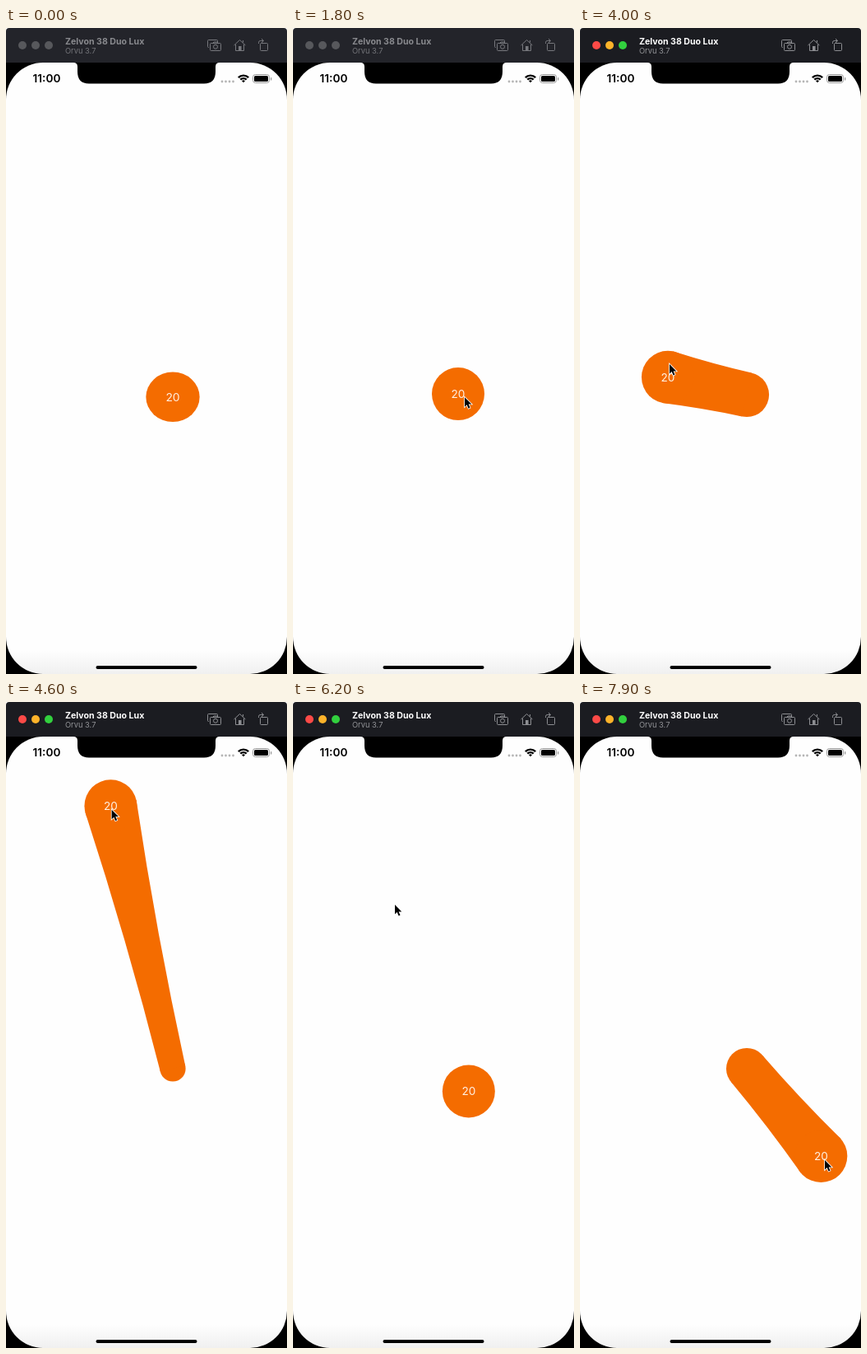
Recreate the animation shown at these times as an HTML page with a canvas. Size 342 by 784 pixels, loop 8000 ms.

```html
<!DOCTYPE html>
<html lang="en">
<head>
<meta charset="utf-8">
<title>Elastic badge</title>
<style>
html, body { margin: 0; width: 100%; height: 100%; overflow: hidden; background: #000; }
canvas { display: block; width: 342px; height: 784px; }
</style>
</head>
<body>
<canvas id="stage" width="342" height="784"></canvas>
<script>
const ctx = document.getElementById('stage').getContext('2d');
const LOOP = 8000, STEP = 100, TAU = Math.PI * 2;
const ORANGE = '#f46c00', HOME = [203, 445], RADIUS = 32;
const ACTIVE_FROM = 2500, CURSOR_FROM = 600, LAG = 40;
const drags = [{ from: 700, to: 1900 }, { from: 3100, to: 6000 }, { from: 7400, to: LOOP }];
const taps = [{ at: 0, depth: .055, shift: 2.8 }, { at: 2700, depth: .345, shift: -2 }];

// Turning points of the cursor: time, x, y
const cursorPath = [
  [700, 211, 449], [1200, 205, 728], [1700, 209, 448], [2700, 208, 454], [3100, 204, 449],
  [3400, 150, 568], [3750, 104, 515], [4000, 109, 408], [4500, 128, 130], [4900, 130, 140],
  [5200, 183, 402], [5400, 208, 452], [5800, 124, 246], [6200, 124, 246], [6600, 206, 448],
  [7400, 206, 448], [7900, 298, 556]
];

// Monotone cubic interpolation: smooth, without overshoot
function cursorAt(t) {
  const path = cursorPath, last = path.length - 1;
  if (t <= path[0][0]) return path[0].slice(1);
  if (t >= path[last][0]) return path[last].slice(1);
  const i = path.findIndex(key => key[0] > t) - 1;
  const a = path[i], b = path[i + 1], span = b[0] - a[0], u = (t - a[0]) / span;
  return [1, 2].map(axis => {
    const slope = n => n < 0 || n >= last ? 0
      : (path[n + 1][axis] - path[n][axis]) / (path[n + 1][0] - path[n][0]);
    const tangent = n => {
      const p = slope(n - 1), q = slope(n);
      return p * q > 0 ? 2 * p * q / (p + q) : 0;
    };
    return a[axis] * (1 + 2 * u) * (1 - u) ** 2 + b[axis] * u * u * (3 - 2 * u)
      + span * (tangent(i) * u * (1 - u) ** 2 + tangent(i + 1) * u * u * (u - 1));
  });
}

// The badge trails the cursor while dragged, then springs back home
function badgeAt(t) {
  const drag = drags.findLast(d => t >= d.from);
  if (!drag) return { pos: HOME, held: false };
  const grip = cursorAt(drag.from), pulled = cursorAt(Math.min(t, drag.to) - LAG);
  const s = Math.max(0, t - drag.to) / 1000;
  const spring = Math.exp(-10 * s) * Math.cos(TAU * s / .4);
  return {
    pos: HOME.map((h, i) => h + (pulled[i] - grip[i]) * spring),
    held: t < drag.to
  };
}

function disc(x, y, r, color) {
  ctx.fillStyle = color;
  ctx.beginPath();
  ctx.arc(x, y, r, 0, TAU);
  ctx.fill();
}

function box(x, y, w, h, r, color) {
  ctx.fillStyle = color;
  ctx.beginPath();
  ctx.roundRect(x, y, w, h, r);
  ctx.fill();
}

function outline(x, y, w, h, r, color) {
  ctx.strokeStyle = color;
  ctx.lineWidth = 1;
  ctx.beginPath();
  ctx.roundRect(x, y, w, h, r);
  ctx.stroke();
}

function line(path, color) {
  ctx.strokeStyle = color;
  ctx.lineWidth = 1;
  ctx.stroke(new Path2D(path));
}

function label(text, x, y, font, color, align = 'left') {
  ctx.font = font + ' Inter, sans-serif';
  ctx.fillStyle = color;
  ctx.textAlign = align;
  ctx.fillText(text, x, y);
}

function drawTitleBar(active) {
  const back = active ? '#1b1c21' : '#23242a', gray = active ? '#8d8e92' : '#77787d';
  ctx.fillStyle = '#fff';
  ctx.fillRect(0, 0, 342, 8);
  box(0, 0, 342, 42, [4, 4, 0, 0], back);
  const lights = active ? ['#fc4a47', '#fdb32a', '#32d03e'] : Array(3).fill('#57585c');
  lights.forEach((color, i) => disc(20 + 16 * i, 21, 5, color));
  label('Zelvon 38 Duo Lux', 72, 20, '700 10.6px', active ? '#fff' : '#898a8e');
  label('Orvu 3.7', 72, 31, '400 9.3px', active ? '#929397' : '#737479');

  outline(245.5, 14.5, 12, 9, 1, gray);
  box(247, 17, 15, 11, 1, back);
  outline(248.5, 18.5, 13, 9, 1, gray);
  line('M252 18L253 17H257L258 18M257.5 22.8A2.5 2.5 0 1 1 252.5 22.8A2.5 2.5 0 1 1 257.5 22.8', gray);
  line('M277.5 21L284.5 14.5L291.5 21M279.5 20V27.5H289.5V20M288.5 17.5V15', gray);
  box(283, 22, 3.5, 5.5, 0, gray);
  outline(309.5, 18.5, 9, 9, 1, gray);
  line('M307.5 19V17.5Q307.5 15.5 309.5 15.5H313M311 13L313.5 15.5L311 18', gray);
}

function drawScreen() {
  ctx.fillStyle = '#000';
  ctx.fillRect(0, 42, 342, 742);
  const shade = ctx.createLinearGradient(0, 755, 0, 784);
  shade.addColorStop(0, '#fefefe');
  shade.addColorStop(1, '#f0f0f0');
  box(0, 42, 342, 742, 45, shade);
  ctx.fillStyle = '#000';
  ctx.fill(new Path2D('M82 42Q87 42 87 47V53Q87 67.5 101 67.5H241Q255 67.5 255 53V47Q255 42 260 42Z'));
  box(109.5, 774, 123, 4, 2, '#000');
}

function drawStatus() {
  label('11:00', 49.5, 66.3, '600 13.6px', '#000', 'center');
  for (let i = 0; i < 4; i++) disc(263 + 4.5 * i, 65, 1.4, '#b5b5b5');
  ctx.strokeStyle = '#000';
  ctx.lineWidth = 2.4;
  for (const r of [1.6, 5.2, 8.7]) {
    ctx.beginPath();
    ctx.arc(289, 66.3, r, -Math.PI * .75, -Math.PI * .25);
    ctx.stroke();
  }
  outline(300.5, 56.5, 20, 10, 3, '#999');
  box(302, 58, 17, 7, 1.6, '#000');
  box(322, 60, 1.3, 3.5, .6, '#999');
}

// Slightly pinched band from the shrinking anchor to the badge
function drawTail(x, y) {
  const dx = x - HOME[0], dy = y - HOME[1], d = Math.hypot(dx, dy);
  if (d < 3) return;
  const r = RADIUS - .05 * d, neck = (r + RADIUS) / 2 * (1 - .0007 * d);
  const edge = (cx, cy, w) => [cx - dy / d * w, cy + dx / d * w];
  const mid = [HOME[0] + dx / 2, HOME[1] + dy / 2];
  disc(...HOME, r, ORANGE);
  ctx.beginPath();
  ctx.moveTo(...edge(...HOME, r));
  ctx.quadraticCurveTo(...edge(...mid, neck), ...edge(x, y, RADIUS));
  ctx.lineTo(...edge(x, y, -RADIUS));
  ctx.quadraticCurveTo(...edge(...mid, -neck), ...edge(...HOME, -r));
  ctx.fill();
}

function drawBadge(t) {
  const { pos: [x, y], held } = badgeAt(t);
  if (held) drawTail(x, y);
  ctx.save();
  ctx.translate(x, y);
  for (const { at, depth, shift } of taps) {
    const pulse = Math.exp(-(((t - at) / 90) ** 2));
    ctx.translate(0, shift * pulse);
    ctx.scale(1 + .02 * pulse, 1 - depth * pulse);
  }
  disc(0, 0, RADIUS, ORANGE);
  label('20', 0, 5, '400 13.6px', '#fff0e2', 'center');
  ctx.restore();
}

function drawCursor(t) {
  if (t < CURSOR_FROM) return;
  ctx.save();
  ctx.translate(...cursorAt(t));
  const arrow = new Path2D('M0 0V11.6L2.7 9.1L4.6 13.5L6.5 12.7L4.6 8.4H8.3Z');
  ctx.strokeStyle = '#fff';
  ctx.lineWidth = 1.6;
  ctx.stroke(arrow);
  ctx.fillStyle = '#000';
  ctx.fill(arrow);
  ctx.restore();
}

function render(now) {
  const t = Math.floor(now % LOOP / STEP) * STEP;
  drawTitleBar(t >= ACTIVE_FROM);
  drawScreen();
  drawStatus();
  drawBadge(t);
  drawCursor(t);
}

let start;
function tick(now) {
  start ??= now;
  render(now - start);
  requestAnimationFrame(tick);
}
render(0);
requestAnimationFrame(tick);
</script>
</body>
</html>
```
